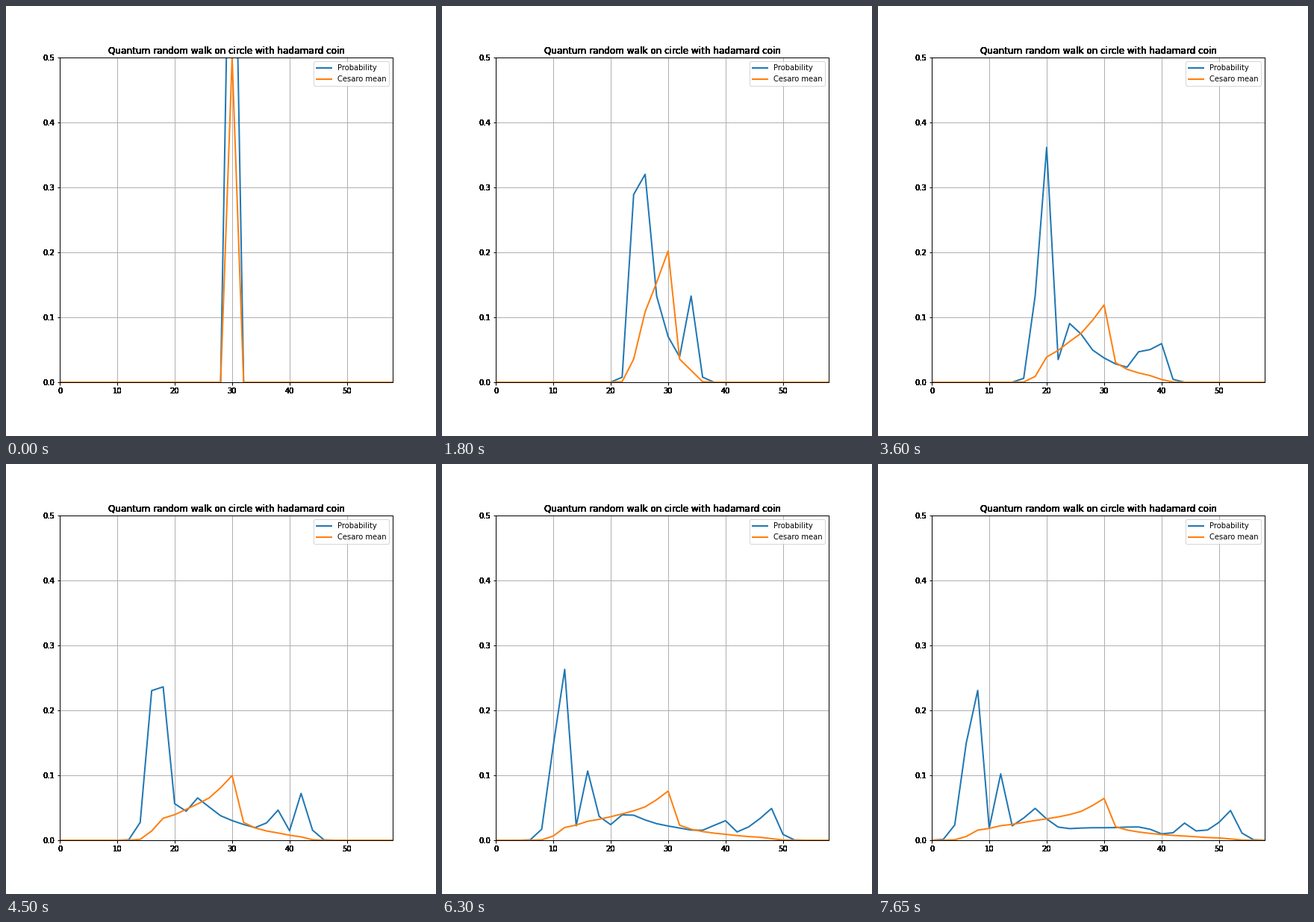
A matplotlib script for the animation above (8 s loop, 576x576 px).

```python
import numpy as np
import matplotlib.pyplot as plt
from matplotlib.animation import FuncAnimation

NODES = 60
STATES = 18
TICK_MS = 50
STATE_MS = 450
LOOP_MS = 8000


def walk(count):
    """Hadamard walk on a circle: probabilities and running means per state."""
    left, right = np.zeros(NODES), np.zeros(NODES)
    left[NODES // 2] = 1
    total = np.zeros(NODES // 2)
    probs, means = [], []
    step = 0
    for k in range(count):
        goal = max(0, 2 * k - 1)
        while step < goal:
            left, right = (left + right) / np.sqrt(2), (left - right) / np.sqrt(2)
            left, right = np.roll(left, -1), np.roll(right, 1)
            step += 1
        # only nodes of the step's parity can be occupied
        p = (left**2 + right**2)[step % 2::2]
        total = total + p
        probs.append(p)
        means.append(total / (step + 2))
    return probs, means


def overdraw(text, times=12):
    """Stack a text on itself so its antialiased edges turn solid."""
    draw = text.draw

    def stacked(renderer):
        for _ in range(times):
            draw(renderer)

    text.draw = stacked


probs, means = walk(STATES)
x = np.arange(0, NODES, 2)

plt.rcParams.update({"font.family": "DejaVu Sans", "font.size": 10})
fig, ax = plt.subplots(figsize=(8, 8), dpi=72)
fig.subplots_adjust(left=0.125, right=0.9, bottom=0.125, top=0.88)

prob_line, = ax.plot(x, probs[0], lw=2, color="#1f77b4", label="Probability")
mean_line, = ax.plot(x, means[0], lw=2, color="#ff7f0e", label="Cesaro mean")

ax.set_xlim(0, NODES - 2)
ax.set_ylim(0, 0.5)
ax.set_xticks(range(0, 51, 10))
ax.set_yticks(np.arange(6) / 10)
ax.tick_params(width=1)
ax.grid(color="#b0b0b0", lw=1)
for spine in ax.spines.values():
    spine.set_linewidth(1)
ax.legend(loc="upper right")
title = ax.set_title("Quantum random walk on circle with hadamard coin", fontsize=12)

for label in [title, *ax.get_xticklabels(), *ax.get_yticklabels()]:
    overdraw(label)


def update(i):
    k = min(i * TICK_MS // STATE_MS, STATES - 1)
    prob_line.set_ydata(probs[k])
    mean_line.set_ydata(means[k])
    return prob_line, mean_line


anim = FuncAnimation(fig, update, frames=LOOP_MS // TICK_MS, interval=TICK_MS,
                     repeat=True, repeat_delay=0, blit=False)
plt.show()
```
